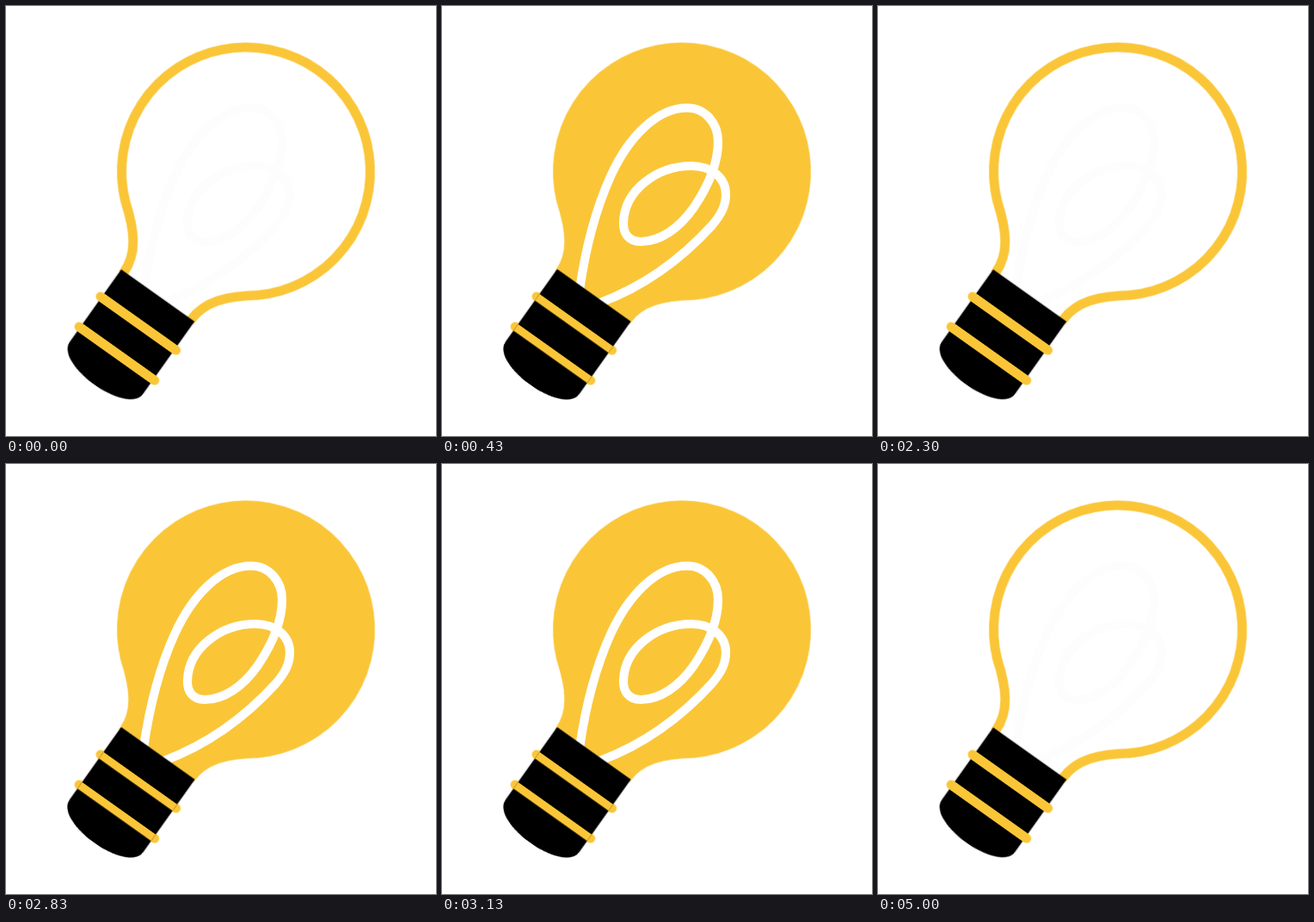
An HTML page for the animation above (5.41 s loop, 500 by 500 pixels).

```html
<!DOCTYPE html>
<html lang="en">
<head>
<meta charset="utf-8">
<title>Light bulb</title>
<style>
  html, body { margin: 0; width: 100%; height: 100%; overflow: hidden; background: #fff; }
  svg { display: block; width: 100%; height: 100%; }
  .line { fill: none; stroke-width: 11; }
  .wire { fill: none; stroke-width: 10.2; }
  .yellow { stroke: #fac638; }
  .glow { fill: #fac638; }
  .cold { stroke: #fdfdfd; }
  .hot { stroke: #fff; }
  .cap { stroke-linecap: round; }
  .thin { stroke-width: 9.4; }
  .lit { animation: blink 5410ms step-end infinite; }
  @keyframes blink {
    0%, 42.5%, 92.4%, 100% { opacity: 0; }
    2.4%, 52.3% { opacity: 1; }
  }
</style>
</head>
<body>
<svg viewBox="0 0 500 500">
  <defs>
    <path id="glass" d="M-47.8 180V178C-47.8 150 -66.5 130.5 -94 109.7A144.5 144.5 0 1 1 94 109.7C66.5 130.5 47.8 150 47.8 178V180"/>
    <path id="wire" d="M160 330C166 288 178 238 196 198C217 152 250 118.5 285 118.5C306 118.5 321 136 321 158C321 180 311 207 293 234C275.5 259 253 274 231 274C217 274 210.5 264 211 252C212 214 250 186 290 186C314 186 330 200 330 219C330 232 325 242 314 255C284 288 240 324 184 345"/>
    <path id="base" d="M-52.3 176.7H52.3V280C52.3 296 25 304 0 304S-52.3 296 -52.3 280Z"/>
  </defs>
  <use href="#wire" class="wire cold"/>
  <g class="lit">
    <use href="#glass" class="glow" transform="translate(279 192.5) rotate(35.4)"/>
    <use href="#wire" class="wire hot"/>
  </g>
  <g transform="translate(279 192.5) rotate(35.4)">
    <use href="#glass" class="line yellow"/>
    <use href="#base"/>
    <path class="line yellow cap" d="M-53.5 216.4H54M-53.5 259.4H54"/>
    <!-- the bands look slimmer across the base while lit -->
    <g class="lit">
      <use href="#base"/>
      <path class="line yellow thin" d="M-52.3 216.6H52.3M-52.3 259.6H52.3"/>
    </g>
  </g>
</svg>
</body>
</html>
```
